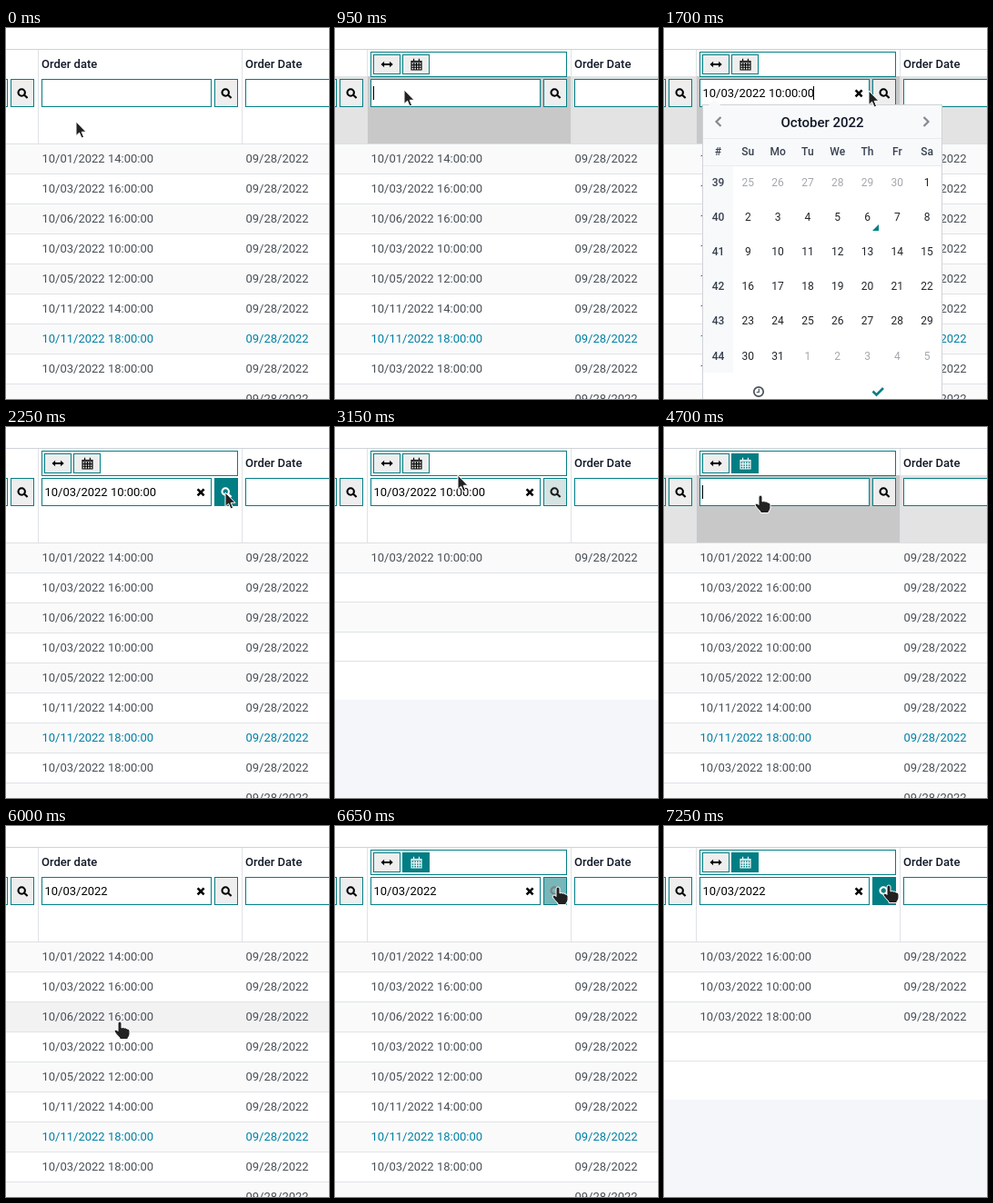
An HTML page that plays this animation: 355 by 408 pixels, repeating every 8.1 s.

```html
<!DOCTYPE html>
<html lang="en">
<head>
<meta charset="utf-8">
<title>Date column filter</title>
<style>
  html, body { margin: 0; width: 100%; height: 100%; overflow: hidden; background: #fff; }
  svg { display: block; }
  text { font: 13px Roboto, sans-serif; fill: #495057; white-space: pre; }
  .title { font-weight: 500; fill: #111827; }
  .value { fill: #000; }
  .link { fill: #0180a5; }
  .month { font-size: 15px; font-weight: 500; fill: #111827; }
  .day { font-size: 12px; fill: #212529; }
  .week { font-size: 12px; font-weight: 500; fill: #374151; }
  .muted { font-size: 12px; fill: #a3a8ad; }
</style>
</head>
<body>
<svg id="stage" width="355" height="408" viewBox="0 0 355 408"></svg>
<script>
const LOOP = 8100, STEP = 50;
const TEAL = '#017e84', LINE = '#dee2e6';
const stage = document.getElementById('stage');

function add(parent, tag, attrs = {}, content) {
  const el = document.createElementNS('http://www.w3.org/2000/svg', tag);
  for (const k in attrs) el.setAttribute(k, attrs[k]);
  if (content !== undefined) el.textContent = content;
  return parent.appendChild(el);
}
const group = (p = stage) => add(p, 'g');
const rect = (p, x, y, width, height, fill) => add(p, 'rect', { x, y, width, height, fill });
const box = (p, x, y, w, h, fill) =>
  add(p, 'rect', { x: x + .5, y: y + .5, width: w - 1, height: h - 1, fill, stroke: TEAL });
const text = (p, x, y, str, cls = '', anchor = 'start') =>
  add(p, 'text', { x, y, class: cls, 'text-anchor': anchor }, str);
const stroke = (p, d, color, width) =>
  add(p, 'path', { d, fill: 'none', stroke: color, 'stroke-width': width });
const show = (el, on) => el.setAttribute('visibility', on ? 'visible' : 'hidden');
const mix = (a, b, k) => `rgb(${a.map((v, i) => Math.round(v + (b[i] - v) * k))})`;
const during = (t, ...spans) => spans.some(([a, b]) => t >= a && t < b);

// Table bodies
function table(dates, lines, end) {
  const g = group();
  rect(g, 0, 128, 355, 280, '#fff');
  lines.forEach((y, i) => {
    const top = i ? lines[i - 1] + 1 : 128;
    if (i % 2 === 0) rect(g, 0, top, 355, y - top, '#fafafa');
    rect(g, 0, y, 355, 1, LINE);
  });
  g.hover = rect(g, 0, 128, 355, 32, '#f2f2f3');
  show(g.hover, false);
  dates.forEach((d, i) => {
    const cls = d.startsWith('10/11/2022 18') ? 'link' : '';
    text(g, 39.5, 148 + 33 * i, d, cls);
    text(g, 263.5, 148 + 33 * i, '09/28/2022', cls);
  });
  if (end < 408) rect(g, 0, end, 355, 408 - end, '#f5f6fa');
  return g;
}
const stamp = s => `10/${s.slice(0, 2)}/2022 ${s.slice(3)}:00:00`;
const all = ['01 14', '03 16', '06 16', '03 10', '05 12', '11 14', '11 18', '03 18'].map(stamp);
const full = table([...all, ''], Array.from({ length: 9 }, (_, i) => 160 + 33 * i), 408);
const byTime = table([all[3]], [160, 192, 225, 257], 300);
const byDay = table([all[1], all[3], all[7]], [160, 193, 226, 258], 301);

// Header
const head = group();
rect(head, 0, 0, 355, 127, '#fff');
rect(head, 0, 23, 355, 1, '#cfd2d6');
rect(head, 0, 127, 355, 1, '#dcdfe2');
const focus = group(head);
rect(focus, 0, 53, 355, 74, '#e3e3e3');
rect(focus, 36, 53, 223, 74, '#c8c8c8');
for (const x of [35, 259]) rect(head, x, 24, 1, 103, LINE);
text(head, 39, 44, 'Order date', 'title');
text(head, 263, 44, 'Order Date', 'title');
const sort = add(head, 'path', { d: 'M106 37.5h8l-4 4.5z', fill: '#bbb' });

function searchButton(x) {
  const bg = box(head, x, 56, 26, 31, '#eeeeee');
  const icon = stroke(head, `M${x + 15.2} 73.7l3.4 3.4M${x + 15.9} 71a3.7 3.7 0 1 1 -7.4 0a3.7 3.7 0 1 1 7.4 0`, '#000', 2.1);
  return { bg, icon };
}
box(head, -20, 56, 22, 31, '#fff');
searchButton(5);
box(head, 39, 56, 187, 31, '#fff');
const search = searchButton(229);
box(head, 263, 56, 120, 31, '#fff');
const value = text(head, 42.5, 76, '', 'value');
const clear = stroke(head, 'M210.6 68.4l7 7M217.6 68.4l-7 7', '#000', 2.6);
const caret = rect(head, 42, 64, 1, 15, '#000');

// Toolbar over the column title
const bar = group();
box(bar, 39, 26, 216, 28, '#fff');
box(bar, 42, 29, 30, 22, '#eeeeee');
add(bar, 'path', { d: 'M50.5 40l3.6-3.3v2.4h6v-2.4l3.6 3.3l-3.6 3.3v-2.4h-6v2.4z', fill: '#000' });
const calBg = box(bar, 74, 29, 30, 22, '#eeeeee');
const calIcon = stroke(bar, 'M84 36.5h11v9.5h-11zM84 38h11M84 40.6h11M84 43.3h11M86.8 38v8M89.5 38v8M92.2 38v8M86.6 33.8v2.6M92.4 33.8v2.6', '#000', 1.1);

// Date picker
const picker = group();
const frame = add(picker, 'rect', { x: 42.5, y: 84.5, width: 263, fill: '#fff', stroke: '#cfd2d6' });
add(picker, 'path', { d: 'M49 85l6.5-6.5l6.5 6.5z', fill: '#f8f9fa' });
rect(picker, 43, 85, 262, 67, '#f8f9fa');
rect(picker, 43, 152, 33, 227, '#f8f9fa');
rect(picker, 43, 121, 262, 1, '#e9ecef');
rect(picker, 43, 151, 262, 1, '#e9ecef');
const cell = rect(picker, 0, 0, 33, 38, '#e9ecef');
stroke(picker, 'M62.5 98l-5 5l5 5M285.5 98l5 5l-5 5', '#868b91', 2.2);
text(picker, 174, 109, 'October 2022', 'month', 'middle');
const colX = c => 59.5 + 32.8 * c, rowY = r => 169.5 + 38.2 * r;
['#', 'Su', 'Mo', 'Tu', 'We', 'Th', 'Fr', 'Sa'].forEach((d, c) =>
  text(picker, colX(c), 140, d, 'week', 'middle'));
for (let r = 0; r < 6; r++) {
  const y = rowY(r) + 4;
  text(picker, colX(0), y, 39 + r, 'week', 'middle');
  for (let c = 0; c < 7; c++) {
    const n = r * 7 + c - 5;
    const inMonth = n > 0 && n < 32;
    const day = n < 1 ? n + 30 : n > 31 ? n - 31 : n;
    text(picker, colX(c + 1), y, day, inMonth ? 'day' : 'muted', 'middle');
  }
}
add(picker, 'path', { d: 'M236 216v7h-7z', fill: TEAL });
const tools = group(picker);
add(tools, 'circle', { cx: 104, cy: 400, r: 5.2, fill: 'none', stroke: '#495057', 'stroke-width': 1.7 });
stroke(tools, 'M104.3 396.8v3.7h-2.6', '#495057', 1.2);
stroke(tools, 'M229.5 399.5l4 4l7.5-7.5', TEAL, 2.6);

// Pointers, drawn with the hot spot at the origin
const ink = { fill: '#222', stroke: '#fff', 'stroke-width': 1, 'stroke-linejoin': 'round' };
const arrow = add(stage, 'path', { d: 'M0 0V15.5L3.6 12.2L6 18L8.6 17L6.2 11.3H11Z', ...ink });
const hand = add(stage, 'path', { d: 'M-2 1Q-2 -1 0 -1Q2 -1 2 1V6Q4 5 5 6Q7 5.5 8 7Q10 6.5 11 9V13Q11 15 9 17V18.5H0V17Q-4 13 -6 10Q-6 8 -4 8Q-3 8 -2 9.5Z', ...ink });

// Pointer path: time, x, y
const path = [
  [0, 77, 103], [150, 77, 103], [300, 76, 68], [1550, 76, 68], [1700, 225, 69],
  [1800, 225, 69], [2000, 241, 72], [2900, 241, 72], [3020, 229, 70], [3150, 135, 53],
  [3300, 90, 40], [3500, 90, 40], [3750, 98, 46], [4100, 98, 46], [4200, 108, 70],
  [4300, 108, 70], [4350, 106, 76], [5250, 106, 76], [5650, 125, 216], [6100, 125, 216],
  [6650, 245, 68], [6900, 245, 68], [7250, 247, 66], [LOOP, 247, 66]
];
function pointer(t) {
  const i = Math.max(1, path.findIndex(p => p[0] >= t));
  const [t0, x0, y0] = path[i - 1], [t1, x1, y1] = path[i];
  const k = Math.max(0, (t - t0) / (t1 - t0));
  return [x0 + (x1 - x0) * k, y0 + (y1 - y0) * k];
}
// Share of the last 150 ms spent over the search button
function searchHover(t) {
  let n = 0;
  for (let i = 0; i < 10; i++) {
    const [x, y] = pointer(Math.max(0, t - 15 * i));
    if (x > 229 && x < 255 && y > 56 && y < 87) n++;
  }
  return n / 10;
}
function paint(btn, icon, k) {
  btn.setAttribute('fill', mix([238, 238, 238], [1, 126, 132], k));
  icon.setAttribute('stroke', mix([0, 0, 0], [255, 255, 255], k));
}

function render(t) {
  const [x, y] = pointer(t);
  const open = during(t, [1050, 2100], [4800, 5900]);
  const timed = during(t, [1350, 3500]), dated = t >= 5900;

  show(byTime, during(t, [2350, 3500]));
  show(byDay, t >= 7100);
  const row = Math.floor((y - 128) / 33);
  show(full.hover, during(t, [6000, 6950]) && row >= 0);
  full.hover.setAttribute('y', 128 + 33 * row);

  show(focus, during(t, [950, 2250], [4700, 6000], [6800, 6950]));
  show(sort, during(t, [3800, 4150]));
  show(bar, during(t, [250, 3500], [4150, 6000]) || (t >= 6150 && y < 127));
  value.textContent = timed ? '10/03/2022 10:00:00' : dated ? '10/03/2022' : '';
  show(clear, timed || dated);
  show(caret, during(t, [950, 1850], [4700, 5300]));
  caret.setAttribute('x', timed ? 164 : 42);
  paint(search.bg, search.icon, searchHover(t));
  paint(calBg, calIcon, Math.min(1, Math.max(0, (t - 3250) / 150)));

  show(picker, open);
  show(tools, open && t < 3000);
  frame.setAttribute('height', t < 3000 ? 340 : 303);
  const c = Math.floor((x - 43) / 32.8), r = Math.floor((y - 151) / 38.2);
  show(cell, open && c > 0 && r >= 0);
  cell.setAttribute('x', 43 + 32.8 * c);
  cell.setAttribute('y', 151 + 38.2 * r);

  show(arrow, t < 3500);
  show(hand, t >= 3500);
  for (const p of [arrow, hand]) p.setAttribute('transform', `translate(${x} ${y})`);
}

const start = performance.now();
function tick() {
  const t = (performance.now() - start) % LOOP;
  render(Math.floor(t / STEP) * STEP);
  requestAnimationFrame(tick);
}
tick();
</script>
</body>
</html>
```
